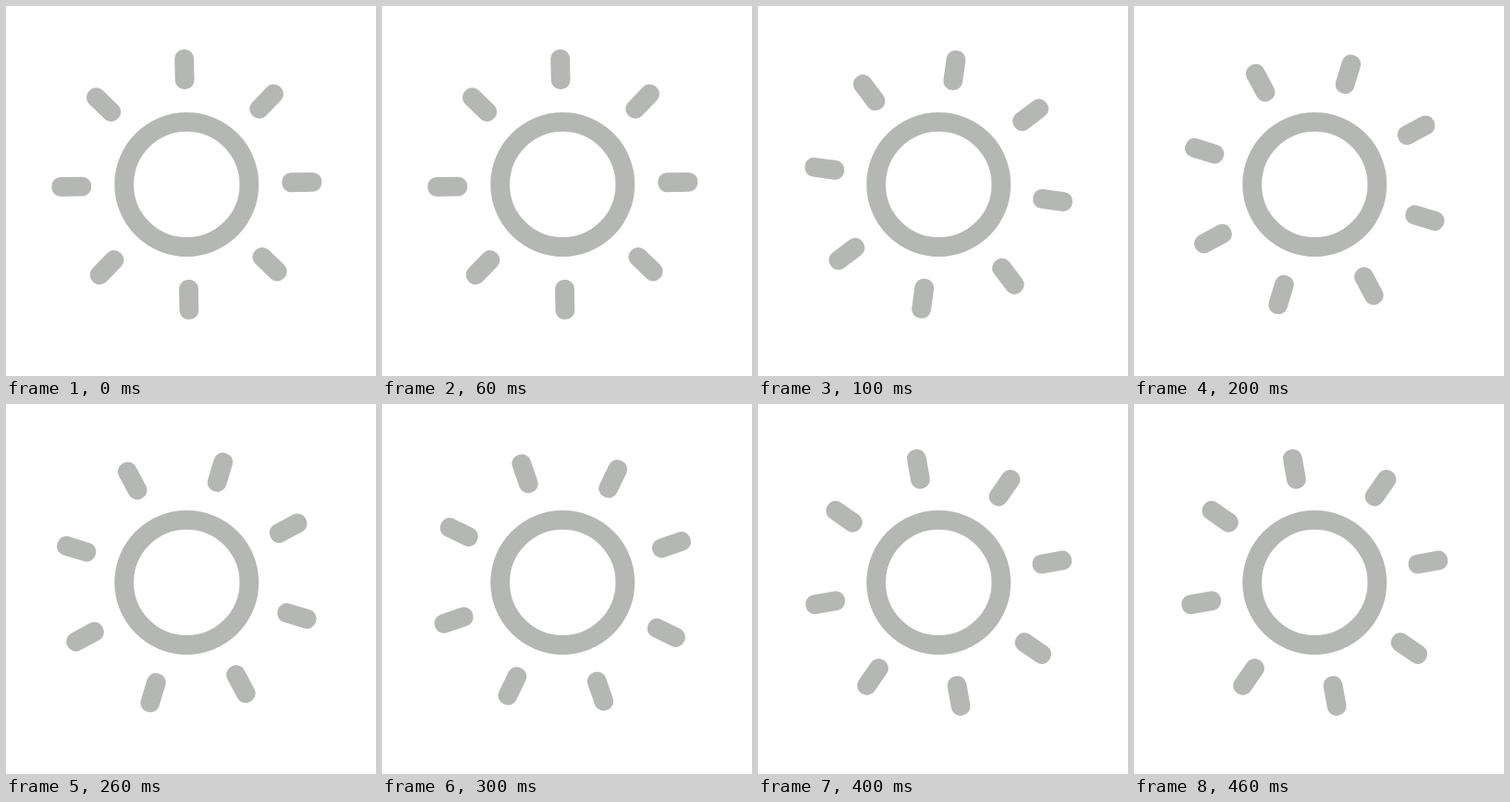
Animation of 400x400 px, one loop 500 ms. Source, as an HTML page:

```html
<!DOCTYPE html>
<html lang="en">
<head>
<meta charset="utf-8">
<title>Turning sun</title>
<style>
  html, body { margin: 0; width: 100%; height: 100%; overflow: hidden; background: #fff; }
  svg { display: block; width: 100vw; height: 100vh; }
</style>
</head>
<body>
<svg viewBox="0 0 400 400">
  <g transform="translate(195.3 192.9)">
    <circle r="67.6" fill="none" stroke="#b4b7b4" stroke-width="20.8"/>
    <g id="rays" fill="#b4b7b4"></g>
  </g>
</svg>
<script>
  const RAYS = 8, GAP = 360 / RAYS;
  const STEPS = 5, STEP_MS = 100;
  const START = -1.1;
  const rays = document.getElementById('rays');

  function addRay(angle) {
    const ray = document.createElementNS(rays.namespaceURI, 'rect');
    const attrs = { x: -10.4, y: -146, width: 20.8, height: 43, rx: 9.8, transform: `rotate(${angle})` };
    for (const key in attrs) ray.setAttribute(key, attrs[key]);
    rays.append(ray);
  }

  for (let i = 0; i < RAYS; i++) addRay(i * GAP);

  // The rays tick round by one gap per loop, in equal steps.
  function draw(ms) {
    const step = Math.floor(ms / STEP_MS) % STEPS;
    rays.setAttribute('transform', `rotate(${START + step * GAP / STEPS})`);
  }

  const begin = performance.now();
  function tick() {
    draw(performance.now() - begin);
    requestAnimationFrame(tick);
  }
  tick();
</script>
</body>
</html>
```
